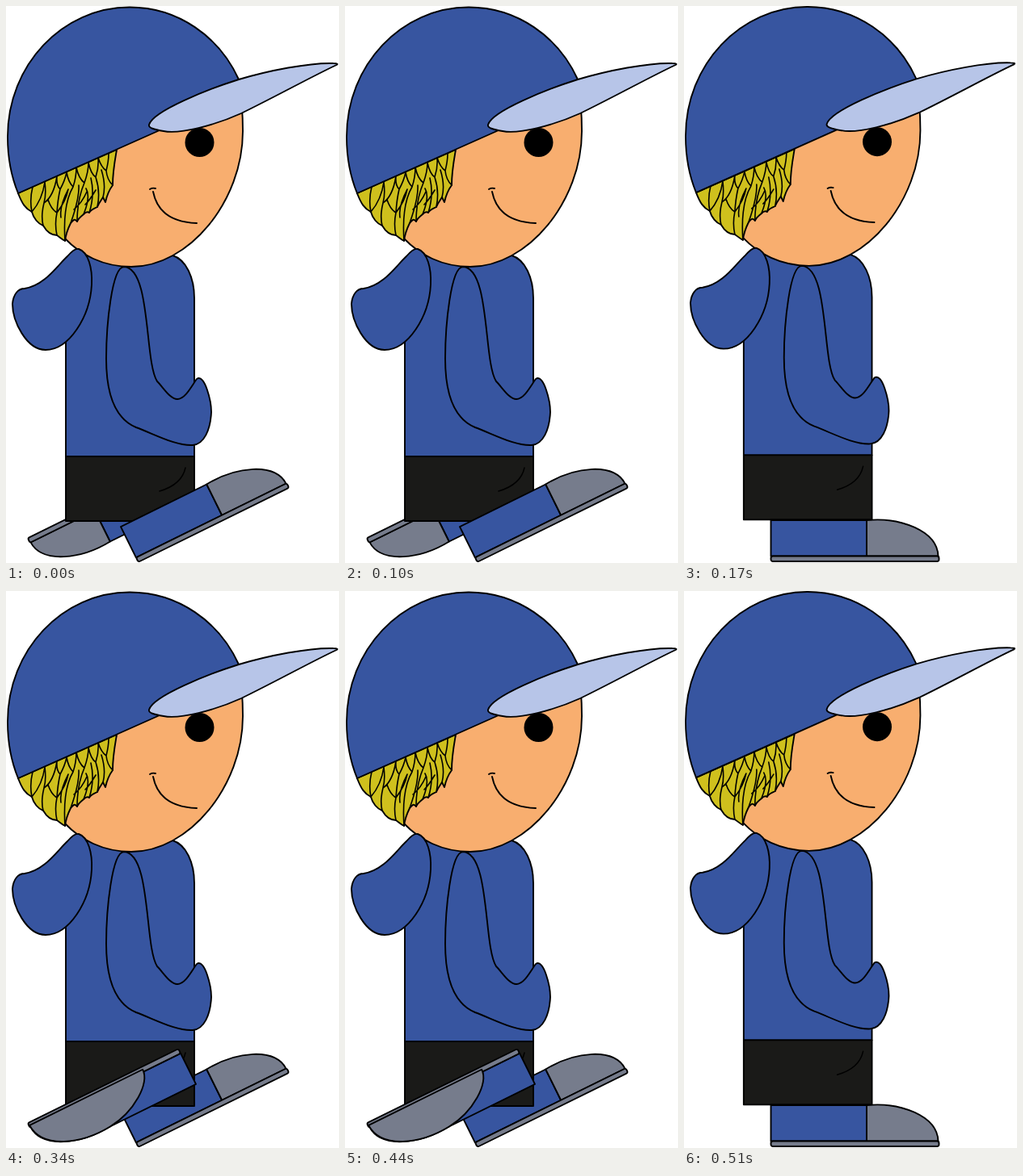
An HTML page that plays this animation: 412x690 px, repeating every 0.68 s.

```html
<!DOCTYPE html>
<html lang="en">
<head>
<meta charset="utf-8">
<title>Walking boy</title>
<style>
html, body { margin: 0; height: 100%; overflow: hidden; background: #fff; }
svg { display: block; width: 100%; height: 100%; }
.blue { fill: #3755a0; }
.grey { fill: #767c8c; }
.skin { fill: #f8ae6f; }
.hair { fill: #cfc01d; }
.line { fill: none; }
</style>
</head>
<body>
<svg viewBox="0 0 412 690" stroke="#000" stroke-width="1.9" stroke-linejoin="round" stroke-linecap="round">
  <defs>
    <g id="leg">
      <path class="blue" d="M0 0H118.500V44.500H0Z"/>
      <path class="grey" d="M118.500 0C160 -4 206 13 207 44.500H118.500Z"/>
      <rect class="grey" y="44.500" width="208" height="6.500" rx="2.500"/>
    </g>
    <g id="wideLeg">
      <use href="#leg"/>
      <path class="grey" d="M51 47.500C50 28 84 3 118.500 0C160 -4 206 13 207 47.500Z"/>
    </g>
  </defs>

  <use id="under"/>

  <g id="body">
    <path class="blue" d="M74 558V320L90 300H206V309C223 314 233 337 233 362V558Z"/>
    <path fill="#1a1a18" d="M74 558H233V638H74Z"/>
    <path class="line" stroke-width="1.5" d="M222 572C219 586 207 596 190 601"/>

    <path class="skin" d="M15 232L288 91C291 110 293 132 293 155C293 242 226 323 155 323C120 323 92 308 73 288Z"/>
    <path class="hair" d="M15 232C20 245 24 251 32 255C34 263 40 270 46 272C50 279 56 284 63 284C66 286 69 289 73 291C74 283 77 275 80 269C83 265 85 263 88 267C90 262 93 261 96 258Q100 254 103 256C105 252 109 251 113 249C115 244 118 240 120 237L123 243C125 234 129 226 132 222C132 205 135 190 137 178Z"/>
    <path class="line" stroke-width="1.6" d="M32 255Q29 240 33 224M32 255Q45 240 48 218Q50 234 47 244Q59 236 63 211Q62 222 67 227Q73 216 75 206Q77 218 83 224Q87 212 87 200Q90 214 97 219Q102 205 102 194Q105 208 111 212Q115 200 114 188Q118 200 124 204Q127 192 127 183
      M47 244Q43 260 46 272M52 240Q56 252 63 256M67 227Q64 240 63 256Q74 242 77 227M63 256Q60 270 63 284
      M83 224Q70 246 73 291M90 222Q91 238 80 269M97 219Q88 240 88 267M99 226Q105 236 96 258
      M105 213Q110 234 103 256M111 212Q117 230 113 249M118 203Q124 222 120 237M124 204Q125 215 132 222
      M77 227Q66 248 68 262M100 230Q94 244 84 252M111 228Q104 240 98 246"/>
    <circle cx="239.500" cy="169" r="18" fill="#000" stroke="none"/>
    <path class="line" d="M182 230C187 255 205 268 236 269M178 227Q181 225 185 226"/>
    <path class="blue" d="M15 232C6 210 2 187 2 162C2 73 70 1.500 153 1.500C213 1.500 264 38 288 91L190 154Z"/>
    <path fill="#b7c5e8" d="M177 147C182 130 250 103 288 91C325 80 375 70 405 71Q412 71 409 73C379 87 334 112 291 133C258 148 215 159 195 155C183 153 176 151 177 147Z"/>

    <path class="blue" d="M90 301C102 305 107 325 106 345C104 385 78 426 49 426C25 426 8 390 8 369C9 357 15 350 23 350C48 346 63 322 76 310C82 303 86 300 90 301Z"/>
    <path class="blue" d="M146 323C180 325 171 440 187 465C195 473 203 487 212 487C222 487 230 470 236 462C246 455 254 490 254 503C253 525 245 543 231 544C210 545 185 531 161 522C132 510 124 475 124 437C124 395 131 323 146 323Z"/>
  </g>

  <use id="over"/>
</svg>
<script>
const STEP = 170;
const forward = 'translate(142 645) rotate(-26.3) scale(1 .96)';
const backward = 'translate(235 611) rotate(153.7) scale(1 .96)';
const standing = 'translate(107.5 637)';
const poses = [
  { under: ['leg', backward], over: ['leg', forward] },
  { under: ['leg', standing] },
  { under: ['leg', forward], over: ['wideLeg', backward] },
  { under: ['leg', standing] }
];
const byId = id => document.getElementById(id);

function place(id, leg) {
  const el = byId(id);
  el.style.display = leg ? '' : 'none';
  if (!leg) return;
  el.setAttribute('href', '#' + leg[0]);
  el.setAttribute('transform', leg[1]);
}

let shown = -1;
function draw(now) {
  const step = Math.floor(now / STEP) % poses.length;
  if (step === shown) return;
  shown = step;
  place('under', poses[step].under);
  place('over', poses[step].over);
  // the body shrinks a touch while standing
  byId('body').setAttribute('transform', step % 2 ? 'translate(0 -.5) scale(.998)' : '');
}

const start = performance.now();
function tick() {
  draw(performance.now() - start);
  requestAnimationFrame(tick);
}
tick();
</script>
</body>
</html>
```
